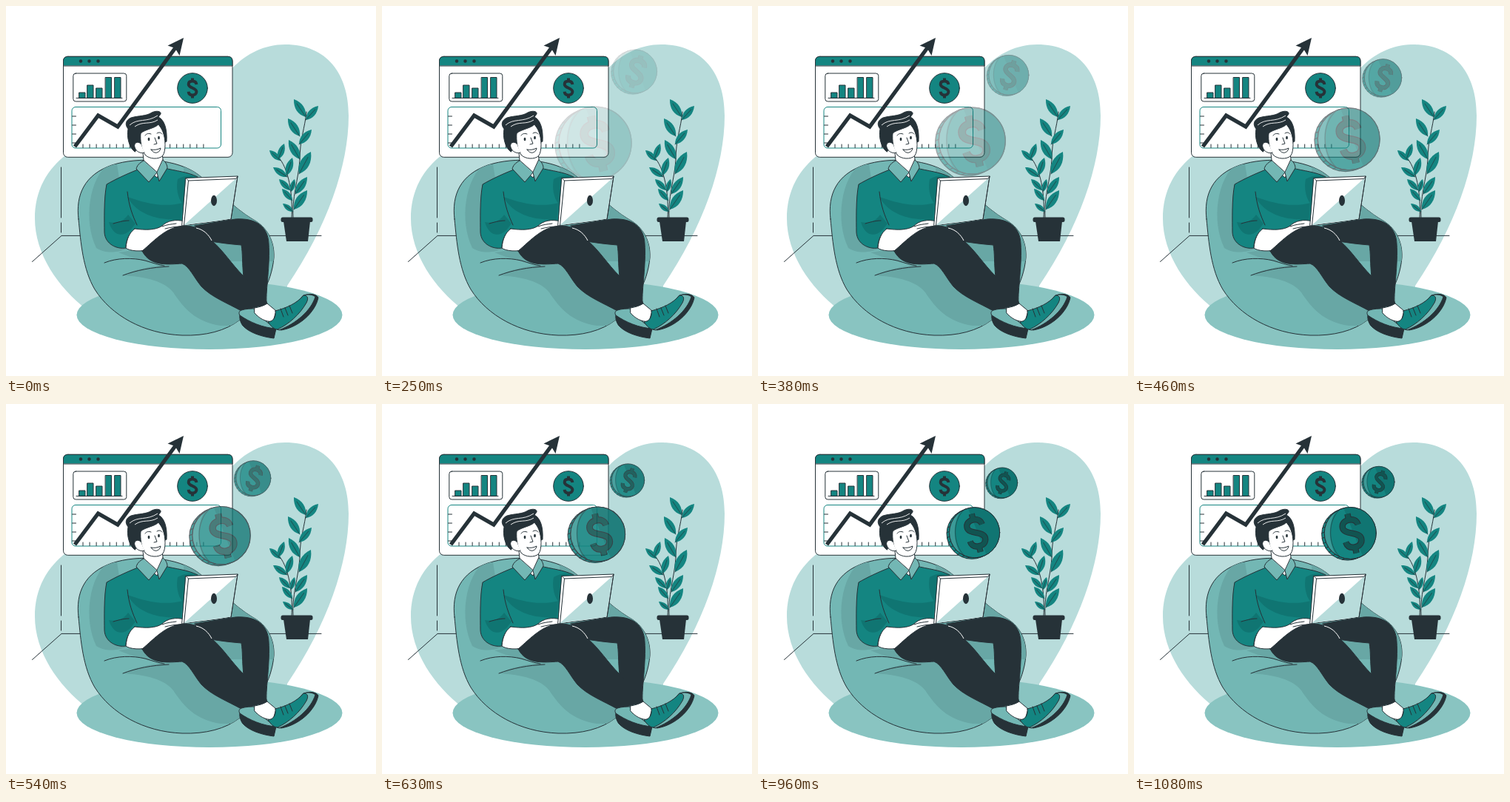
Recreate the animation shown at these times as an HTML page. Size 500x500 px, loop 1120 ms.

```html
<!DOCTYPE html>
<html lang="en">
<head>
<meta charset="utf-8">
<title>Growing income</title>
<style>
  html, body { margin: 0; width: 100%; height: 100%; overflow: hidden; background: #fff; }
  svg { display: block; width: 100vw; height: 100vh; }
  .ink { fill: #263238; }
  .teal { fill: #148581; }
  .pale { fill: #b8dcdb; }
  .soft { fill: #73b7b4; }
  .white { fill: #fff; }
  .line { stroke: #263238; stroke-width: 1; stroke-linecap: round; stroke-linejoin: round; }
  .open { fill: none; }
</style>
</head>
<body>
<svg viewBox="0 0 500 500" xmlns="http://www.w3.org/2000/svg">
  <defs>
    <path id="dollar" d="M5.4-5C5-8.3 2.6-9.4 0-9.4C-3.4-9.4-5.3-7.6-5.3-5C-5.3 0 5.4-.4 5.4 4.8C5.4 7.5 3.4 9.4 0 9.4C-2.8 9.4-5 8.2-5.4 4.8M0-13.6V-9.4M0 9.4V13.6"/>
    <clipPath id="bagClip"><use href="#bag"/></clipPath>
    <clipPath id="face"><circle r="35"/></clipPath>
    <g id="coin">
      <circle class="line" cx="-3.600" cy="1.600" r="35" fill="#148581"/>
      <g id="ridges" class="line"></g>
      <circle class="teal line" r="35"/>
      <g clip-path="url(#face)">
        <path d="M-10-36L18 34L40 40V-40Z" fill="#107572"/>
        <path d="M-14-36C-32-20-32 18-14 36L-40 38V-38Z" fill="#3c9a97"/>
        <path class="line open" d="M-14-32C-31-18-31 16-14 32" stroke-opacity=".6"/>
      </g>
      <circle class="line open" r="35"/>
    </g>
  </defs>

  <path class="pale" d="M306 84C325 64 350 52 377 52C434 52 463 92 463 148C463 216 434 298 380 378L380 420L110 411C70 380 39 335 39 287C39 250 55 220 84 199Z"/>
  <path class="line open" d="M74.500 218V286M74.500 293V306M35.500 345.500L75 310.400H426"/>
  <ellipse cx="275" cy="417.500" rx="179.500" ry="46.500" fill="#89c4c1"/>

  <g id="plant">
    <path class="line open" d="M388 287C386 260 395 235 397 208C397 180 404 165 406 143M386 287C388 255 382 218 367 203"/>
    <g id="leaves"></g>
    <path class="ink" d="M375 291H411L408 318H379Z"/>
    <rect class="ink" x="371.500" y="285.500" width="43" height="6.500" rx="2.500"/>
  </g>

  <g id="window">
    <rect class="white line" x="77.500" y="68.300" width="228.500" height="136" rx="6"/>
    <path class="teal line" d="M77.500 80.600V74.300Q77.500 68.300 83.500 68.300H300Q306 68.300 306 74.300V80.600Z"/>
    <g class="ink"><circle cx="101" cy="74.500" r="2.200"/><circle cx="112.500" cy="74.500" r="2.200"/><circle cx="124.500" cy="74.500" r="2.200"/></g>
    <rect class="white line" x="90.800" y="91" width="72" height="38" rx="3.500"/>
    <g id="bars"></g>
    <path class="line" d="M95 124.400H157"/>
    <circle class="teal line" cx="252" cy="111" r="20.300"/>
    <use href="#dollar" transform="translate(252 111)" fill="none" stroke="#263238" stroke-width="4"/>
    <rect x="89" y="136.500" width="201.500" height="55.500" rx="5" fill="none" stroke="#148581"/>
    <path id="ticks" class="line open"/>
    <path d="M93 190L124.500 148L151 163L230 55" fill="none" stroke="#263238" stroke-width="5.200"/>
    <path class="ink" d="M240 43L218.500 53.500L228.500 57L234.500 67Z"/>
  </g>

  <g id="coins">
    <use href="#coin" transform="translate(292.300 174.500)"/>
    <g id="bigSign" transform="translate(294.500 175) rotate(-13) scale(2)"></g>
    <use href="#coin" transform="translate(331 105.300) scale(.6)"/>
    <g id="smallSign" transform="translate(332 105.500) rotate(17) scale(1.180)"></g>
  </g>

  <g id="beanbag">
    <path id="bag" class="soft line" d="M98 288C94 255 106 228 143 215C180 203 232 207 260 228C283 246 308 273 333 288C354 299 363 319 362 340C359 375 340 405 316 424C297 439 270 446 238 445C186 443 142 418 120 383C104 356 101 320 98 288Z"/>
    <g clip-path="url(#bagClip)" fill="#68a7a5">
      <path d="M140 212C112 232 104 290 122 327C132 334 150 335 168 326L150 214Z"/>
      <path d="M158 364C190 366 214 372 226 387C240 408 256 427 290 432L312 432L340 400L270 345L215 350C190 352 172 357 158 364Z"/>
      <path d="M152 333L186 328L214 351C190 345 172 342 152 333Z"/>
      <path d="M240 206L364 300V345H300L240 290Z"/>
    </g>
    <path class="line open" d="M133 347C150 340 171 340 188 344C198 347 206 350 214 351M158 364C176 357 198 353 220 352"/>
  </g>

  <g id="body">
    <path class="teal line" d="M181 220C165 226 148 234 136 241C132 260 133 291 133 306C134 322 150 329 162 327L190 320L242 297L258 236L259 231C245 224 230 223 214 219Z"/>
    <g fill="#107572">
      <path d="M164 258C174 276 190 283 208 287L236 290L239 266C212 273 187 266 164 258Z"/>
      <path d="M139 292C144 309 156 314 168 303L175 294L165 282C158 292 149 294 139 292Z"/>
      <path d="M232 234C240 229 250 228 258 231L258 236H244L239 268C231 258 230 244 232 234Z"/>
    </g>
    <path class="line open" d="M164 251C166 270 171 283 177 296M145 294C155 291 161 290 166 290M172 304C168 306 162 315 162 326"/>
    <path class="white line" d="M174 301C188 303 203 303 211 297C218 290 229 288 242 291L239 300C223 308 210 322 196 328C184 333 166 331 162 327C163 315 167 306 174 301Z"/>
    <path class="line open" d="M211 298C218 295 224 295 230 294M215 301C223 299 229 298 236 298"/>
    <path class="ink line" d="M255 297L310 288C339 286 354 299 355 321C357 350 351 383 352 401C347 407 338 407 334 403L321 366C319 348 320 334 318 323C303 322 290 320 276 318Z"/>
    <path class="ink line" d="M184 331C202 316 217 297 244 297C262 298 272 308 279 318C294 331 305 349 321 365C337 379 350 393 353 402L334 408L318 412C300 402 277 393 264 379C254 367 248 352 238 348C220 349 195 353 184 331Z"/>
    <path d="M257 300C267 302 274 309 278 317" fill="none" stroke="#fff"/>
  </g>

  <g id="laptop">
    <path class="white line" d="M243 232.500L313 230L304 288C281 292 260 294 238 297Z"/>
    <path class="pale" d="M312 232L303.500 287.500C281 291 261 293 240 296.500Z"/>
    <path class="line open" d="M313 230.500L310.500 233.500L246.500 236L240.500 297M243 232.500L246.500 236M313 230L304 288"/>
    <ellipse class="ink" cx="281" cy="263" rx="4" ry="7.200"/>
  </g>

  <g id="shoes">
    <path class="ink line" d="M316 417C330 427 346 434 365 436L362 449C345 447 328 441 320 432C317 428 315 422 316 417Z"/>
    <path class="soft line" d="M318 411C325 409 331 409 337 409C344 420 354 430 366 436C347 435 329 427 316 418C314 415 315 412 318 411Z"/>
    <path class="white line" d="M336 408C342 407 349 405 353 402L365 412L361 426C351 428 341 421 336 415Z"/>
    <path class="ink line" d="M403 391C410 388 419 389 422 394C418 414 396 434 372 438L366 437Z"/>
    <path class="soft line" d="M402 391C408 389 415 390 418 393C412 412 392 429 369 438L362 435Z"/>
    <path class="teal line" d="M364 412C379 408 393 402 402 391C408 391 409 395 406 401C397 417 382 430 367 437C361 437 357 431 354 427C362 426 365 420 364 412Z"/>
    <path class="line open" d="M371 409L375 420M377 408L381 418M383 405L387 415"/>
  </g>

  <g id="head">
    <path class="white line" d="M184 190L187 217L204 232L213 216L211 198Z"/>
    <path class="soft line" d="M186 209C180 212 177 216 176 220L193 238L204 225Z"/>
    <path class="soft line" d="M212 208C216 211 218 215 218 219L207 237L204 225Z"/>
    <path class="ink line" d="M174 197C166 191 163 177 165 166C160 160 162 154 169 151C179 148 190 149 197 144C203 141 210 142 209 146L206 150C214 154 218 166 217 183L211 186L180 190Z"/>
    <path class="white line" d="M182 172C181 182 183 194 188 201C193 207 207 208 212 202C216 196 216 180 212 170C210 165 208 163 206 160C200 166 189 166 182 172Z"/>
    <path class="white line" d="M182 186C178 182 172 185 174 191C176 197 182 200 187 198"/>
    <path d="M167 161C178 151 190 158 205 148M174 163C185 155 194 161 205 154" fill="none" stroke="#fff" stroke-width=".9"/>
    <ellipse class="ink" cx="193" cy="180" rx="1.400" ry="2.300"/>
    <ellipse class="ink" cx="206.500" cy="178" rx="1.400" ry="2.300"/>
    <path class="line open" d="M188 175C190 172 193 172 196 173M204 172C207 170 209 171 211 173M201 178L204 186L200 187M196 194C201 195 205 194 209 192C208 199 200 201 196 194"/>
  </g>
</svg>

<script>
const LOOP = 1120, STEPS = 27, EASE_STEPS = 25.5, HIDDEN_STEPS = 3;
const CENTER = [303, 147.5];
const byId = id => document.getElementById(id);
const fill = (id, parts) => { byId(id).innerHTML = parts.join(""); };
const range = n => [...Array(n).keys()];

// Each leaf runs from its base to its tip.
function leaf([x, y, tipX, tipY]) {
  const length = Math.hypot(tipX - x, tipY - y);
  const angle = Math.atan2(tipY - y, tipX - x) * 180 / Math.PI;
  const w = length * .25;
  return `<g transform="translate(${x} ${y}) rotate(${angle})">
    <path class="teal" d="M0 0C${length * .3} ${-w} ${length * .65} ${-w} ${length} 0C${length * .65} ${w} ${length * .3} ${w} 0 0Z"/>
    <path class="line open" stroke-opacity=".6" d="M0 0H${length * .75}"/></g>`;
}

fill("leaves", [
  [405, 150, 389, 126], [405, 154, 422, 135], [397, 176, 381, 152], [396, 187, 413, 167],
  [397, 207, 382, 181], [396, 227, 412, 197], [391, 254, 407, 231], [389, 275, 407, 249],
  [371, 209, 356, 195], [368, 207, 376, 186], [380, 231, 361, 218], [379, 229, 387, 205],
  [384, 249, 369, 234], [385, 251, 390, 234], [387, 263, 373, 247], [388, 278, 374, 267]
].map(leaf));

fill("bars", [[99, 117], [110, 107], [122, 111], [134.5, 96.5], [147, 96.5]].map(([x, y]) =>
  `<rect class="teal line" x="${x}" y="${y}" width="8" height="${124.4 - y}"/>`));

byId("ticks").setAttribute("d",
  range(4).map(i => `M89.5 ${149 + 12 * i}h5`).join("") +
  range(19).map(i => `M${104 + 9.05 * i} 191.5v-4.5`).join(""));

fill("ridges", range(14).map(i => {
  const a = (102 + i * 11.5) * Math.PI / 180;
  const x = 35 * Math.cos(a), y = 35 * Math.sin(a);
  return `<path d="M${x} ${y}l-3.6 1.6"/>`;
}));

for (const id of ["bigSign", "smallSign"]) {
  fill(id, [["#263238", 4.2], ["#115451", 3.2]].map(([color, width]) =>
    `<use href="#dollar" fill="none" stroke="${color}" stroke-width="${width}"/>`));
}

function cubicBezier(x1, y1, x2, y2) {
  const at = (u, a, b) => 3 * u * (1 - u) ** 2 * a + 3 * u * u * (1 - u) * b + u ** 3;
  return x => {
    let low = 0, high = 1;
    for (let i = 0; i < 30; i++) {
      const mid = (low + high) / 2;
      if (at(mid, x1, x2) < x) low = mid; else high = mid;
    }
    return at((low + high) / 2, y1, y2);
  };
}

const ease = cubicBezier(.36, -.01, .5, 1.38);
const coins = byId("coins");

function render(time) {
  const step = Math.floor((time % LOOP) * STEPS / LOOP);
  const progress = step < HIDDEN_STEPS ? 0 : ease(Math.min(1, step / EASE_STEPS));
  const scale = 1.5 - .5 * progress;
  const [x, y] = CENTER;
  coins.setAttribute("transform", `translate(${x} ${y}) scale(${scale}) translate(${-x} ${-y})`);
  coins.setAttribute("opacity", Math.max(0, Math.min(1, progress)));
}

const start = performance.now();
function tick() {
  render(performance.now() - start);
  requestAnimationFrame(tick);
}
tick();
</script>
</body>
</html>
```
